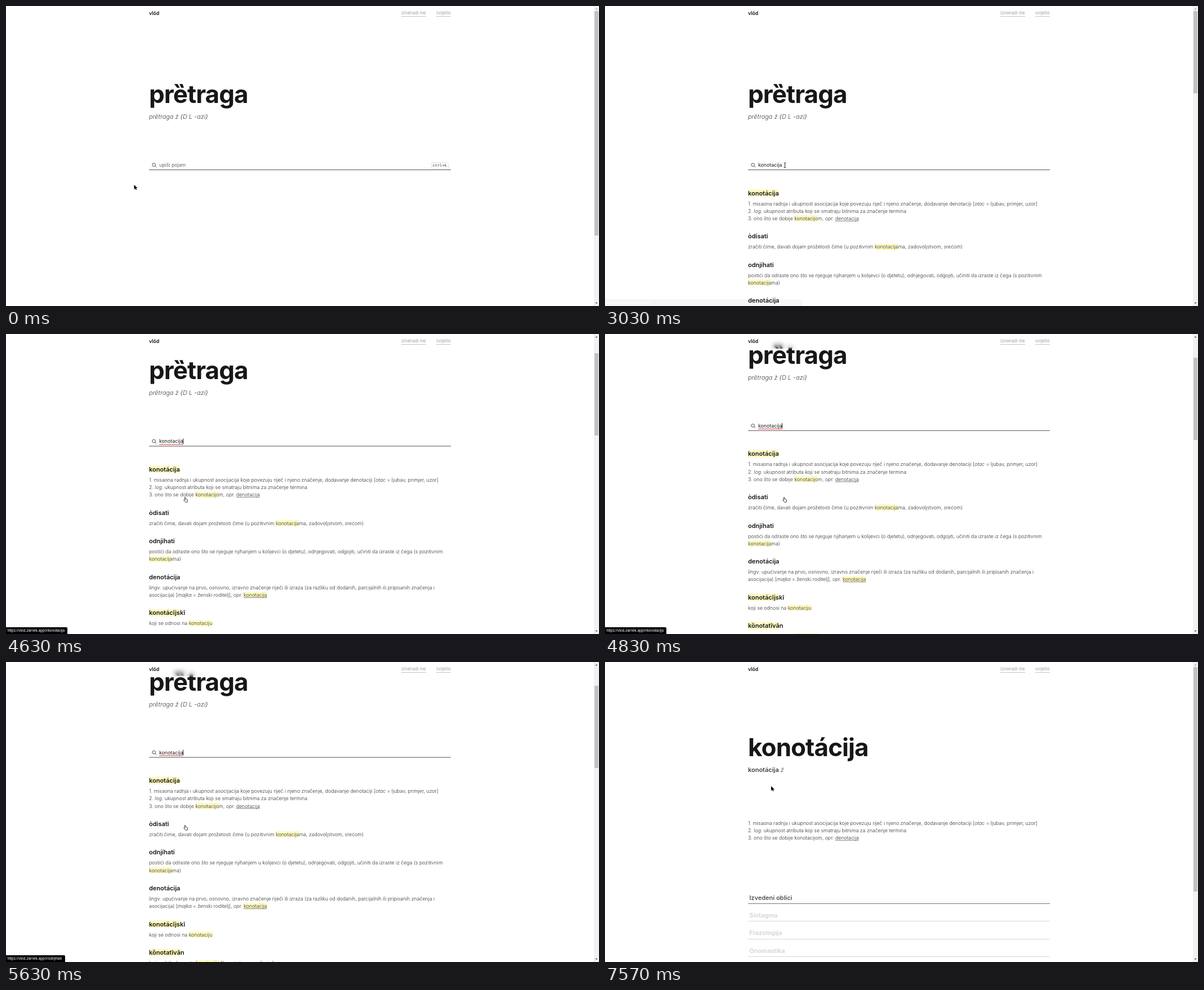
Write an HTML page that moves like this. It is 1053 px wide and 532 px high and loops after 8000 ms.

```html
<!DOCTYPE html>
<html lang="hr">
<head>
<meta charset="utf-8">
<title>prȅtraga</title>
<style>
  html, body { margin: 0; width: 100%; height: 100%; overflow: hidden; background: #fff; }
  body { position: relative; font: 8.77px Inter, "DejaVu Sans", sans-serif; font-optical-sizing: none; color: #404040; }
  #stage { position: absolute; left: 0; top: 0; width: 1053px; height: 532px; overflow: hidden; }
  #stage div, #stage svg, header { position: absolute; white-space: pre; }
  #stage svg { left: 0; top: 0; }
  .page { left: 0; top: 0; width: 1044px; height: 900px; }
  .line { left: 254px; line-height: 0; }
  .title { font-size: 43.9px; font-weight: 700; letter-spacing: -.02em; color: #171717; }
  .sub { font-size: 10.97px; font-weight: 300; }
  .rule { left: 254px; width: 535.5px; height: 1px; }
  .block { left: 254px; font-size: 16px; line-height: 24px; font-weight: 300; color: #333;
    transform: scale(.54844); transform-origin: 0 0; }
  h2 { margin: 0 0 8px; font-size: 20px; font-weight: 600; line-height: 28px; color: #171717; }
  p { margin: 0 0 32px; }
  mark { background: #fef9c3; color: inherit; }
  u { text-decoration-thickness: 1.2px; text-underline-offset: 2.4px; text-decoration-skip-ink: none; }
  header { left: 0; top: 0; width: 1044px; height: 26px; backdrop-filter: blur(4.4px); }
  .nav { top: 12.9px; font-size: 7.68px; color: #a0a0a0; }
  .navline { top: 18px; height: 1px; background: #c4c4c4; }
  #kbd { left: 754.5px; top: 276.5px; width: 29px; height: 10px; border: .6px solid #e2e2e2; border-radius: 2px;
    font: 7.1px/10px "DejaVu Sans Mono", monospace; text-align: center; }
  #typed { color: #171717; text-decoration-color: #e5333f; text-decoration-thickness: 1px;
    text-underline-offset: 1.8px; text-decoration-skip-ink: none; }
  #caret { left: 272px; top: 277px; width: 1px; height: 10px; background: #222; }
  #bar { left: 1044px; top: 0; width: 9px; height: 532px; background: #f1f1f1; }
  #thumb { left: 1px; width: 7px; background: #c1c1c1; }
  #status { left: 0; top: 520px; height: 12px; padding-left: 2.5px; box-sizing: border-box; background: #000; color: #fff;
    border-radius: 0 2px 0 0; font: 6.58px/12.5px "Liberation Sans", Arial, sans-serif; }
</style>
</head>
<body>
<div id="stage">
  <div class="page" id="search">
    <div class="line title" style="top:156px">prȅtraga</div>
    <div class="line sub" style="top:196.2px"><i>prȅtraga ž ⟨D L -azi⟩</i></div>
    <svg style="left:258px;top:277px" width="10" height="10" fill="none" stroke="#333" stroke-width=".9">
      <circle cx="4.6" cy="4.6" r="2.8"/><path d="M6.6 6.6 9 9"/></svg>
    <div class="line" id="hint" style="left:272px;top:281.7px;color:#666">upiši pojam</div>
    <div class="line" style="left:272px;top:281.7px"><span id="typed"></span></div>
    <div id="caret"></div>
    <div id="kbd">ctrl+k</div>
    <div class="rule" style="top:290px;background:#555"></div>
    <div class="block" id="early" style="top:323.6px"></div>
    <div class="block" id="found" style="top:323.6px"></div>
  </div>
  <div class="page" id="word">
    <div class="line title" style="top:151px">konotácija</div>
    <div class="line sub" style="top:191px"><b style="font-weight:600">konotácija</b> <i>ž</i></div>
    <div class="block" id="meaning" style="top:279.1px"></div>
  </div>
  <header>
    <div class="line" style="top:12.9px;font-weight:600;color:#171717">vlōd</div>
    <div class="line nav" style="left:702px">iznenadi me</div>
    <div class="line nav" style="left:764px">svijetlo</div>
    <div class="navline" style="left:702px;width:44px"></div>
    <div class="navline" style="left:764px;width:26px"></div>
  </header>
  <div id="bar">
    <div id="thumb"></div>
    <svg width="9" height="532" fill="#505050">
      <path id="up" d="M2.3 6.2 4.5 4 6.7 6.2Z"/><path d="M2.3 525.8 4.5 528 6.7 525.8Z"/></svg>
  </div>
  <div id="status"></div>
  <svg width="1053" height="532">
    <g id="cursor">
      <path id="arrow" d="M0 0V8.2L1.9 6.4 3.2 9.3 4.6 8.7 3.4 5.9H5.9Z"/>
      <path id="beam" fill="none" stroke="#111" stroke-width=".9" d="M-1.9-4.3H-.5L0-3.8.5-4.3H1.9M0-3.8V3.8M-1.9 4.3H-.5L0 3.8.5 4.3H1.9"/>
      <path id="hand" fill="#fff" stroke="#111" stroke-width=".8" d="M-.8.8a.8.8 0 0 1 1.6 0V3.2l2.8.6q1.2.3 1 1.6L4 8.6H.4L-2.1 5.6q-.3-1.1.8-.8l.5.5Z"/>
    </g>
  </svg>
</div>
<script>
const $ = id => document.getElementById(id);
const show = (id, on) => { $(id).style.display = on ? '' : 'none'; };
const ramp = (t, a, b) => { const x = Math.min(1, Math.max(0, (t - a) / (b - a))); return x * x * (3 - 2 * x); };

// {highlight}, *italic*, _link_
const markup = s => s.replace(/\{(.*?)\}/g, '<mark>$1</mark>').replace(/\*(.*?)\*/g, '<i>$1</i>').replace(/_(.*?)_/g, '<u>$1</u>');
const entries = list => list.map(([head, text]) => markup(`<h2>${head}</h2><p>${text}</p>`)).join('');

const senses = `1. misaona radnja i ukupnost asocijacija koje povezuju riječ i njeno značenje, dodavanje denotaciji [*otac* = ljubav, primjer, uzor]
2. *log.* ukupnost atributa koji se smatraju bitnima za značenje termina
3. ono što se dobije `;

$('early').innerHTML = entries([
  ['setpoint', '*term.* namještena, referentna vrijednost; u tehničkim procesima dobiva se pomoću instrumenta'],
  ['sette bandiere', '*v.* _šetebandijere_'],
  ['settecento', '*pov. umj.* u povijesti talijanske umjetnosti i kulture naziv za 18. st.'],
  ['sette giorni', '*reg.* komoda sa 7 ladica, jednom ispod druge, u kojoj se drži rublje za svaki dan po redu u tjednu (građanski stil primorskih kuća)'],
  ['setup', '']
]);
$('found').innerHTML = entries([
  ['{konotácija}', senses + '{konotacijo}m, *opr.* _denotacija_'],
  ['òdisati', 'zračiti čime, davati dojam prožetosti čime (u pozitivnim {konotacija}ma, zadovoljstvom, srećom)'],
  ['odnjíhati', 'postići da odraste ono što se njeguje njihanjem u kolijevci (o djetetu), odnjegovati, odgojiti, učiniti da izraste iz čega (s pozitivnim\n{konotacija}ma)'],
  ['denotácija', '*lingv.* upućivanje na prvo, osnovno, izravno značenje riječi ili izraza (za razliku od dodanih, parcijalnih ili pripisanih značenja i\nasocijacija) [*majka* = ženski roditelj], *opr.* _{konotacija}_'],
  ['{konotácījs}kī', 'koji se odnosi na {konotaciju}'],
  ['{kȍnotatīvā}n', 'koji sadrži elemente {konotacije} [*konotativno značenje*]'],
  ['{konotí}rati', 'imati {konotaciju}']
]);
$('meaning').innerHTML = markup(senses + 'konotacijom, *opr.* _denotacija_');

['Izvedeni oblici', 'Sintagma', 'Frazologija', 'Onomastika'].forEach((name, i) => {
  const y = 417.6 + i * 31.3;
  $('word').insertAdjacentHTML('beforeend',
    `<div class="line sub" style="left:256.3px;top:${y}px;font-weight:600;color:${i ? '#d2d2d2' : '#525252'}">${name}</div>
     <div class="rule" style="top:${Math.round(y + 10.5)}px;background:${i ? '#d8d8d8' : '#777'}"></div>`);
});

const query = 'konotacija';
const keyTimes = [1200, 1330, 1500, 1670, 1830, 2030, 2100, 2170, 2230, 2300];
const moves = [ // start, end, x, y
  [30, 470, 319.5, 282.5], [3310, 3470, 318.5, 286.5], [3850, 3900, 318, 287.5], [4050, 4100, 318, 288.5],
  [4400, 4500, 318, 289.5], [5980, 6530, 295, 225], [6680, 6830, 295, 220]
];
const wheel = [[4230, 4430, 54.84], [4440, 4750, 54.84], [4770, 5000, 54.84], [5445, 5710, -54.84]];
const pointers = [[0, 'arrow'], [330, 'beam'], [4450, 'hand'], [6120, 'beam'], [6350, 'hand'], [7070, 'arrow']];
const host = 'vlod.zarnek.app';
const link = word => `https://${host}/r/${word}`;
const statuses = [ // start, width, text
  [0, 0, ''], [2570, 350, `Waiting for ${host}...`], [4270, 0, ''], [4450, 109, link('konotacija')],
  [5300, 105, link('odnjihati')], [6370, 109, link('konotacija')], [7000, 350, link('konotacija')]
];
const current = (list, t) => list.filter(item => item[0] <= t).pop();

function draw(t) {
  const onWord = t >= 7070;
  show('search', !onWord);
  show('word', onWord);

  const scroll = onWord ? 0 : wheel.reduce((sum, [a, b, d]) => sum + d * ramp(t, a, b), 0);
  $('search').style.transform = `translateY(${-scroll}px)`;

  const typed = query.slice(0, keyTimes.filter(k => k <= t).length);
  $('typed').textContent = typed;
  $('typed').style.textDecorationLine = t >= 3400 ? 'underline' : 'none';
  show('hint', !typed);
  show('kbd', t < 670);
  const blinkOn = t < 2270 || Math.floor((t - 2270) / 533) % 2 === 0;
  show('caret', t >= 670 && blinkOn);
  $('caret').style.left = 272 + $('typed').offsetWidth + 'px';
  show('early', t >= 1400 && t < 2300);
  show('found', t >= 2300);

  const height = onWord || t < 1400 ? 687 : t < 2300 ? 1462 : 1873;
  $('thumb').style.top = 9 + scroll * 514 / height + 'px';
  $('thumb').style.height = 514 * 532 / height + 'px';
  $('up').style.fill = scroll > 0 ? '#505050' : '#a3a3a3';

  const [, width, text] = current(statuses, t);
  $('status').textContent = text;
  $('status').style.width = width + 'px';
  show('status', width > 0);
  $('status').style.opacity = t < 4270 ? 1 - .97 * ramp(t, 2860, 3030) : 1 - ramp(t, 7400, 7570);

  let x = 227.5, y = 317;
  for (const [a, b, toX, toY] of moves) {
    const k = ramp(t, a, b);
    x += (toX - x) * k;
    y += (toY - y) * k;
  }
  $('cursor').setAttribute('transform', `translate(${x} ${y})`);
  const [, pointer] = current(pointers, t);
  for (const id of ['arrow', 'beam', 'hand']) show(id, id === pointer);
}

const start = performance.now();
(function loop() {
  draw((performance.now() - start) % 8000);
  requestAnimationFrame(loop);
})();
</script>
</body>
</html>
```
